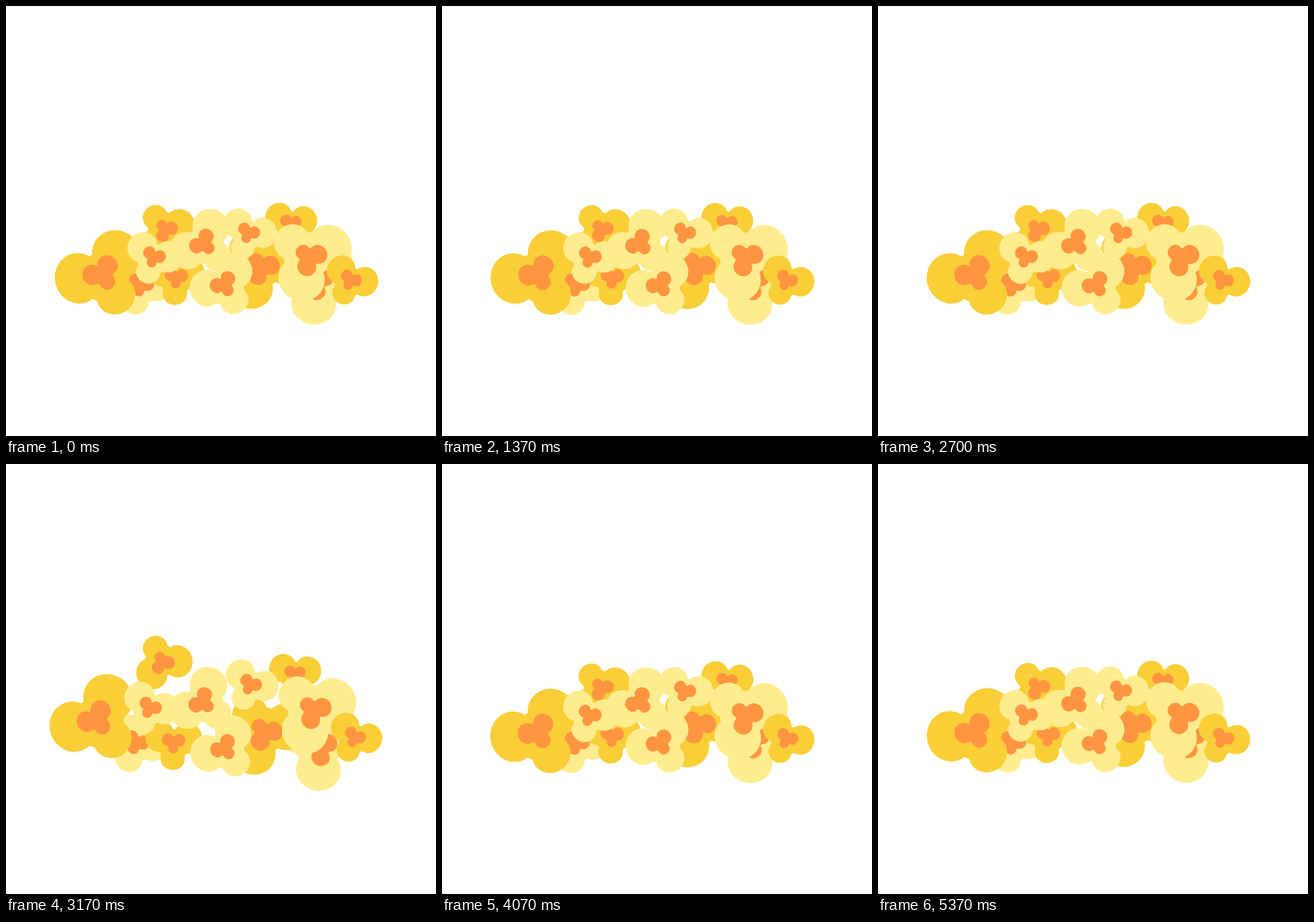
Write an HTML page with a canvas that moves like this. It is 500x500 px and loops after 5.41 s.

```html
<!DOCTYPE html>
<html lang="en">
<head>
<meta charset="utf-8">
<title>Popcorn</title>
<style>
  html, body { margin: 0; width: 100%; height: 100%; overflow: hidden; background: #fff; }
  canvas { display: block; width: 500px; height: 500px; }
</style>
</head>
<body>
<canvas id="stage" width="500" height="500"></canvas>
<script>
const ctx = document.getElementById('stage').getContext('2d');
const DARK = '#f9ce37', LIGHT = '#ffec8e', CORE = '#ff9540';
const LOOP = 5410, STEP = 33.37, LAST = 161, CYCLE = LAST / 4;

// Beats of one hop, in steps
const CROUCH = 10.5, APEX = 19.3, LAND = 25.7, SETTLED = 36.5;

const rad = deg => deg * Math.PI / 180;
const smooth = k => k * k * (3 - 2 * k);
const settle = k => 1 - (1 - k) ** 3;
const mix = (a, b, k) => a.map((v, i) => v + (b[i] - v) * k);
const clamp = (v, lo = 0, hi = 1) => Math.max(lo, Math.min(hi, v));

// A piece at rest: centre, size, direction of its small lobe;
// in the air: turn in degrees and height of the hop
const pieces = [];
function popcorn(color, x, y, size, angle, turn, hop) {
  const side = x - 250;
  pieces.push({
    color, x, y, size, angle,
    lag: (x - 110) / 240,
    crouch: [clamp(side * 0.12, -17, 8), 14, -turn / 4],
    apex: [-side * 0.04, -hop, turn],
    land: [Math.min(0, (x - 265) * 0.1), 20, turn]
  });
}

// Back to front
popcorn(DARK, 186, 261, 17.5, -129, 60, 100);
popcorn(DARK, 331, 252, 15.5, 98, -20, 66);
popcorn(LIGHT, 157, 323, 19, 108, 24, 21);
popcorn(LIGHT, 363, 322, 24.5, -150, -18, 4);
popcorn(DARK, 198, 315, 17, 95, -8, 2);
popcorn(DARK, 298, 305, 25.5, -128, 6, 2);
popcorn(DARK, 111, 310, 27.5, 58, -25, 52);
popcorn(LIGHT, 282, 263, 16.5, 111, 38, 54);
popcorn(LIGHT, 229, 275, 20.5, 45, -24, 24);
popcorn(LIGHT, 172, 291, 17, 110, 22, 44);
popcorn(LIGHT, 253, 323, 20, 57, -36, 9);
popcorn(LIGHT, 354, 294, 25.5, -138, 21, 61);
popcorn(DARK, 401, 318, 16, 117, -28, 50);

function pose(p, phase) {
  const rest = [0, 0, 0];
  const t = phase - p.lag * clamp(phase / CROUCH);
  const along = (from, to) => clamp((t - from) / (to - from));
  if (t < CROUCH) return mix(rest, p.crouch, smooth(along(0, CROUCH)));
  if (t < APEX) return mix(p.crouch, p.apex, smooth(along(CROUCH, APEX)));
  if (t < LAND) return mix(p.apex, p.land, smooth(along(APEX, LAND)));
  return mix(p.land, rest, settle(along(LAND, SETTLED)));
}

// Trefoil: a small lobe ahead and two wide ones at its sides, joined by a soft web
function trefoil(color, size) {
  const lobes = [-108, 0, 108].map(deg => {
    const a = rad(deg), reach = size * (deg ? 1 : 1.15);
    return { a, x: reach * Math.cos(a), y: reach * Math.sin(a), r: size * (deg ? 1 : 0.78) };
  });
  ctx.fillStyle = ctx.strokeStyle = color;
  ctx.lineJoin = 'round';
  ctx.lineWidth = size * 1.1;
  ctx.beginPath();
  for (const { x, y } of lobes) ctx.lineTo(x, y);
  ctx.closePath();
  ctx.fill();
  ctx.stroke();
  for (const { a, x, y, r } of lobes) {
    ctx.beginPath();
    ctx.ellipse(x, y, r, r * 1.07, a, 0, 2 * Math.PI);
    ctx.fill();
  }
}

function draw(time) {
  const step = Math.min(LAST, Math.floor((time + 5) / STEP));
  const phase = step % CYCLE;
  ctx.clearRect(0, 0, 500, 500);
  for (const p of pieces) {
    const [dx, dy, turn] = pose(p, phase);
    ctx.save();
    ctx.translate(p.x + dx, p.y + dy);
    ctx.rotate(rad(p.angle + turn));
    trefoil(p.color, p.size);
    trefoil(CORE, p.size * 0.41);
    ctx.restore();
  }
}

const start = performance.now();
function tick() {
  draw((performance.now() - start) % LOOP);
  requestAnimationFrame(tick);
}
tick();
</script>
</body>
</html>
```
